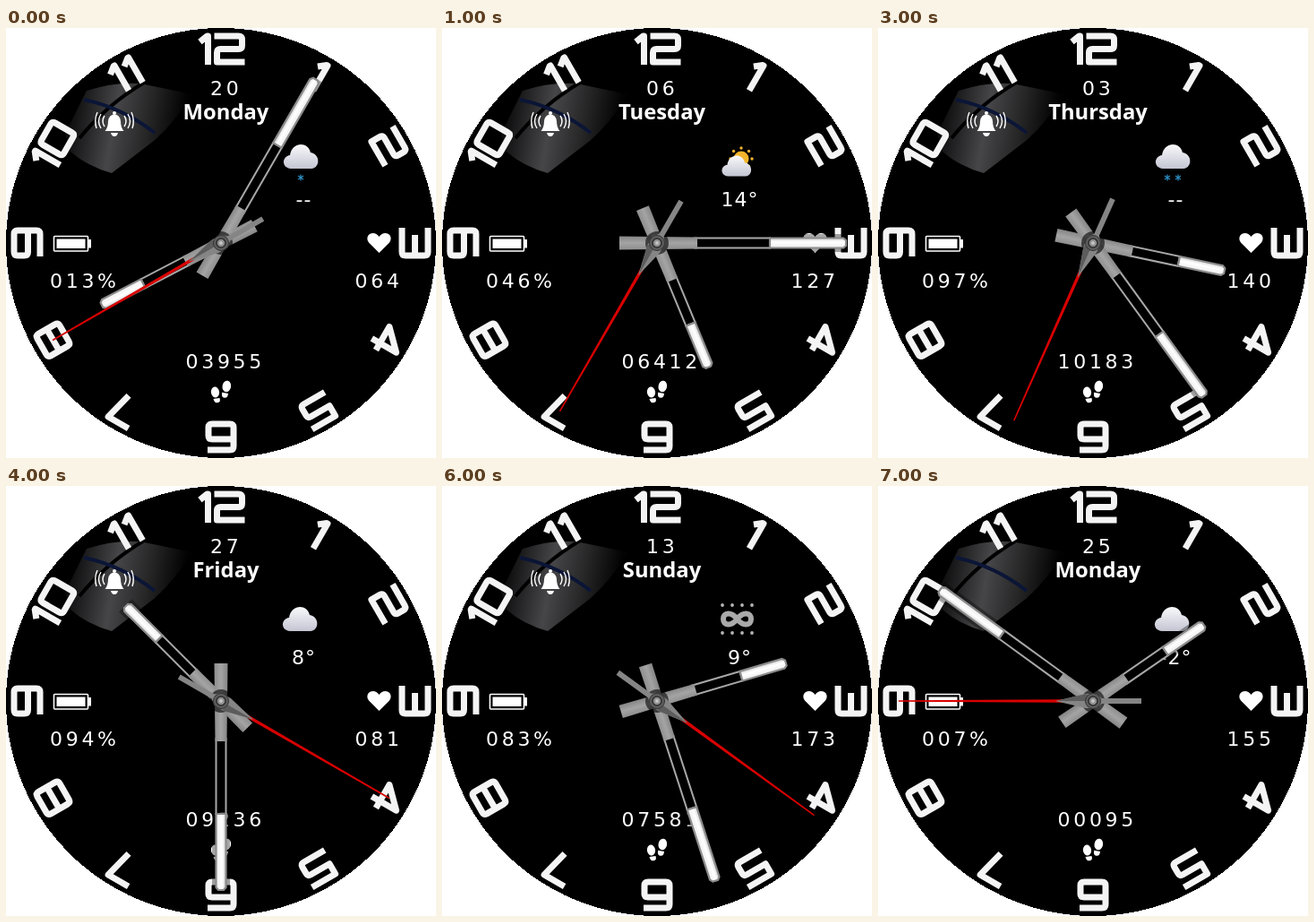
An HTML page that plays this animation: 480x480 px, repeating every 8 s.

```html
<!DOCTYPE html>
<html lang="en">
<head>
<meta charset="utf-8">
<title>Watch face</title>
<style>
html, body { margin: 0; width: 100%; height: 100%; overflow: hidden; background: #fff; }
svg { display: block; width: 100vw; height: 100vh; }
.num { font: 22px "DejaVu Sans", sans-serif; letter-spacing: 3.7px; fill: #fff; }
.temp { font: 22px "DejaVu Sans", sans-serif; letter-spacing: 1px; fill: #fff; text-anchor: middle; }
.day { font: bold 23.8px "Open Sans", "Noto Sans", sans-serif; fill: #fff; text-anchor: middle; }
</style>
</head>
<body>
<svg viewBox="0 0 480 480">
  <defs>
    <linearGradient id="gloss" gradientUnits="userSpaceOnUse" x1="72" y1="90" x2="196" y2="112">
      <stop offset="0" stop-color="#0b0b0c"/><stop offset=".4" stop-color="#464648"/>
      <stop offset=".7" stop-color="#262627"/><stop offset="1" stop-color="#020202"/>
    </linearGradient>
    <linearGradient id="steel">
      <stop offset="0" stop-color="#858585"/><stop offset=".5" stop-color="#a4a4a4"/><stop offset="1" stop-color="#8e8e8e"/>
    </linearGradient>
    <linearGradient id="lume">
      <stop offset="0" stop-color="#d4d4d4"/><stop offset=".4" stop-color="#fff"/><stop offset="1" stop-color="#ededed"/>
    </linearGradient>
    <linearGradient id="puff" x1="0" y1="0" x2="0" y2="1">
      <stop offset="0" stop-color="#fafafc"/><stop offset="1" stop-color="#c3c5d2"/>
    </linearGradient>
    <linearGradient id="twist">
      <stop offset="0" stop-color="#2f6fe0"/><stop offset=".5" stop-color="#7db8ff"/><stop offset="1" stop-color="#2860d0"/>
    </linearGradient>
    <path id="cloud" fill="url(#puff)" d="M318 157C307 156 308 143 317 142C319 127 337 126 340 139C351 141 351 156 341 157Z"/>
  </defs>
  <circle cx="240" cy="240" r="240" shape-rendering="crispEdges"/>

  <path fill="url(#gloss)" d="M66 118L90 70Q120 60 150 62L208 74Q188 106 165 126L118 162Q90 154 72 138Z"/>
  <path fill="none" stroke="#000" stroke-width="4" d="M154 61Q112 86 82 123"/>
  <path fill="none" stroke="#0b1536" stroke-width="4" d="M87 80Q130 89 166 117"/>

  <g id="dial" fill="none" stroke="#f4f4f4" stroke-width="7" stroke-linejoin="round"></g>

  <g id="bell" fill="#fff">
    <circle cx="121" cy="95" r="2"/>
    <path d="M110.500 115Q114 111 114 104Q115 96.500 121 96.500Q127 96.500 128 104Q128 111 131.500 115Z"/>
    <path d="M117 117H125Q124 121 121 121Q118 121 117 117Z"/>
    <path fill="none" stroke="#fff" stroke-width="1.400" d="M110 98Q106 104 110 110M106 96Q101 104 106 112M102 94Q98 103 101 112M132 98Q136 104 132 110M136 96Q141 104 136 112M140 94Q144 103 141 112"/>
  </g>
  <g fill="#fff">
    <rect x="53.500" y="232.500" width="38" height="16.500" rx="1" fill="none" stroke="#fff" stroke-width="1.600"/>
    <rect x="56.500" y="235.500" width="32" height="10.500"/>
    <rect x="92" y="236" width="3" height="9.500"/>
    <path d="M416.500 251L405 239.500C399 231 411 224.500 416.500 233C422 224.500 434 231 428 239.500Z"/>
    <g transform="rotate(-8 234 410)"><ellipse cx="234" cy="406.500" rx="4.600" ry="6"/><path d="M231 413.500H238Q239 418.500 235 418.500Q231.500 418.500 231 413.500Z"/></g>
    <g transform="rotate(10 246 402)"><ellipse cx="246" cy="400" rx="4.800" ry="6.300"/><path d="M242 407.500H249Q249.500 413 245.500 413Q242 413 242 407.500Z"/></g>
  </g>

  <text id="date" class="num" x="228" y="75"></text>
  <text id="day" class="day" x="245.500" y="102"></text>
  <text id="power" class="num" x="49" y="290"></text>
  <text id="pulse" class="num" x="389.500" y="289.500"></text>
  <text id="steps" class="num" x="200.500" y="380"></text>
  <g id="sky"></g>
  <text id="temp" class="temp" x="332.500" y="199"></text>

  <g transform="translate(240 240)">
    <g id="hour"></g>
    <g id="minute"></g>
    <circle r="13" opacity=".6"/>
    <g id="second">
      <path fill="#d90000" d="M-1.800 -34L-.8 -217H.8L1.800 -34Z"/>
      <path fill="#858585" d="M0 -42L8 -8V4L3 10V54H-3V10L-8 4V-8Z"/>
      <path fill="#5c5c5c" d="M0 -40L8 -8L3 0H0Z"/>
    </g>
    <circle r="8.500" fill="#5d5d5d" stroke="#333"/>
    <circle r="5" fill="#8e8e8e" stroke="#2c2c2c" stroke-width="1.500"/>
    <circle r="2" fill="#c4c4c4"/>
  </g>
</svg>
<script>
const el = id => document.getElementById(id);

// Numerals as strokes around their own centre
const digit = {
  0: "M-10-14.500H10q4 0 4 4V10.500q0 4-4 4H-10q-4 0-4-4V-10.500q0-4 4-4Z",
  1: "M-9-8L-1-14.500H0V17.500",
  2: "M-17-14.500H10q4 0 4 4V-4q0 4-4 4H-10q-4 0-4 4V14.500H17",
  3: "M-17-14.500H10q4 0 4 4V10.500q0 4-4 4H-17M-9 0H14",
  4: "M8 17.500V-14L-13 7H17",
  5: "M16-14.500H-14V-1.500H10q4 0 4 4V10.500q0 4-4 4H-17",
  6: "M15-14.500H-10q-4 0-4 4V10.500q0 4 4 4H10q4 0 4-4V1.500q0-4-4-4H-14",
  7: "M-14-14.500H12L4 17.500",
  8: "M-10-14.500H10q4 0 4 4V10.500q0 4-4 4H-10q-4 0-4-4V-10.500q0-4 4-4ZM-14 0H14",
  9: "M-15 14.500H10q4 0 4-4V-10.500q0-4-4-4H-10q-4 0-4 4V-3q0 4 4 4H14"
};
const glyph = (d, x) => `<path transform="translate(${x} 0)" d="${digit[d]}"/>`;

function numeral(n) {
  let art;
  if (n === 1) art = glyph(1, 4);
  else if (n < 10) art = glyph(n, 0);
  else if (n === 11) art = glyph(1, -4) + glyph(1, 14);
  else art = glyph(1, -14.5) + glyph(n - 10, 9.5);
  return `<g transform="rotate(${n * 30} 240 240) translate(240 23.500)">${art}</g>`;
}

const hand = (len, mid) => `
  <rect x="-10" y="${-len}" width="20" height="${len - 40}" opacity=".35"/>
  <rect x="-5.500" y="${-mid}" width="11" height="${mid - 42}" fill="#000" fill-opacity=".7" stroke="#a8a8a8" stroke-width="2"/>
  <path d="M-5.500 ${-mid}V${4 - len}L-3 ${1 - len}H3L5.500 ${4 - len}V${-mid}Z" fill="url(#lume)" stroke="#8c8c8c" stroke-width="2.200"/>
  <path d="M-6.500 -45H6.500L7.500 42H-7.500Z" fill="url(#steel)"/>`;

const cloud = '<use href="#cloud"/>';
const flake = x => `<path transform="translate(${x} 167)" stroke="#2c8fc4" stroke-width="1.200" d="M0-3.500V3.500M-3-2L3 2M-3 2L3-2"/>`;

function sun() {
  let dots = "";
  for (let i = 0; i < 8; i++) {
    const a = i * Math.PI / 4;
    dots += `<circle cx="${334 + 12 * Math.cos(a)}" cy="${146 + 12 * Math.sin(a)}" r="1.700"/>`;
  }
  return `<g fill="#f5b52c">${dots}<circle cx="334" cy="146" r="8.500"/></g>
    <use href="#cloud" transform="translate(49 32) scale(.85)"/>`;
}

function haze() {
  let dots = "";
  for (let i = 0; i < 4; i++)
    for (const y of [133, 164]) dots += `<circle cx="${313 + i * 11}" cy="${y}" r="1.900"/>`;
  return `<g fill="#b5b5b5">${dots}</g><path fill="none" stroke="#aaa" stroke-width="6"
    d="M329.500 148.500C323 140 314 141 314 148.500S323 157 329.500 148.500S345 141 345 148.500S336 157 329.500 148.500Z"/>`;
}

const tornado = `<path fill="none" stroke="url(#twist)" stroke-width="4.800" stroke-linecap="round" stroke-linejoin="round"
  d="M343 137Q328 139 315 134Q314 142 326 143L341 144Q320 143 318 147Q320 151 341 153Q323 151 323 155Q326 158 338 159Q328 158 329 162L335 164"/>
  <g fill="#5da0f0"><circle cx="346" cy="140" r="1.300"/><circle cx="314" cy="151" r="1.200"/><circle cx="344" cy="157" r="1.200"/></g>`;

const skies = {
  snow: cloud + flake(329),
  sleet: cloud + flake(323) + flake(335),
  cloud: `<g transform="translate(-1 5)">${cloud}</g>`,
  sun: sun(), haze: haze(), tornado
};

// day, date, h, m, s, battery, pulse, steps, sky, temperature
const scenes = [
  ["Monday", "20", 8, 5, 40, "013%", "064", "03955", "snow", "--"],
  ["Tuesday", "06", 5, 15, 35, "046%", "127", "06412", "sun", "14°"],
  ["Wednesday", "12", 4, 9, 59, "085%", "058", "11824", "tornado", "11°"],
  ["Thursday", "03", 3, 24, 34, "097%", "140", "10183", "sleet", "--"],
  ["Friday", "27", 10, 30, 20, "094%", "081", "09236", "cloud", "8°"],
  ["Saturday", "14", 2, 48, 59, "091%", "092", "08770", "sun", "17°"],
  ["Sunday", "13", 2, 27, 21, "083%", "173", "07581", "haze", "9°"],
  ["Monday", "25", 1, 51, 45, "007%", "155", "00095", "cloud", "-2°"]
];

let dial = "";
for (let n = 1; n <= 12; n++) dial += numeral(n);
el("dial").innerHTML = dial;
el("hour").innerHTML = hand(151, 98);
el("minute").innerHTML = hand(212, 126);

const turn = (id, deg) => el(id).setAttribute("transform", `rotate(${deg})`);
let shown = -1;

function render(ms) {
  const i = Math.floor(ms / 1000) % scenes.length;
  if (i === shown) return;
  shown = i;
  const [day, date, h, m, s, power, pulse, steps, sky, temp] = scenes[i];
  const words = { day, date, power, pulse, steps, temp };
  for (const id in words) el(id).textContent = words[id];
  el("sky").innerHTML = skies[sky];
  el("bell").style.display = i === 7 ? "none" : "";
  turn("hour", h * 30 + m / 2);
  turn("minute", m * 6);
  turn("second", s * 6);
}

render(0);
let start;
requestAnimationFrame(function tick(now) {
  start ??= now;
  render(Math.max(0, now - start));
  requestAnimationFrame(tick);
});
</script>
</body>
</html>
```
